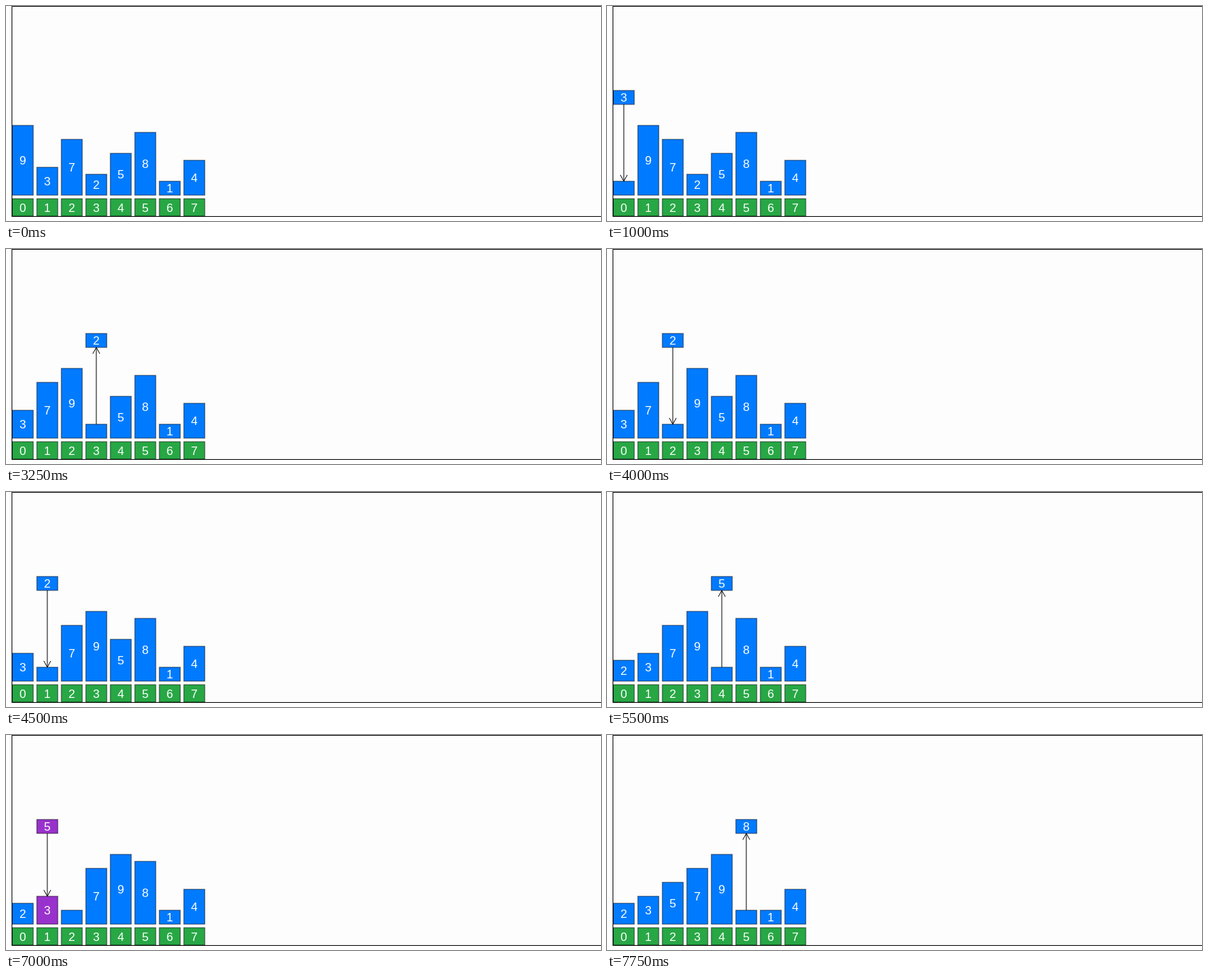
These frames come from a looping animation (850x308 px, 8000 ms). An HTML page with a canvas:

```html
<!DOCTYPE html>
<html lang="en">
<head>
<meta charset="utf-8">
<title>Insertion sort</title>
<style>
  html, body { margin: 0; width: 100%; height: 100%; overflow: hidden; background: #fff; }
  canvas { display: block; }
</style>
</head>
<body>
<canvas id="stage" width="850" height="308"></canvas>
<script>
const STEP = 250, LOOP = 8000;
const BLUE = '#007bff', GREEN = '#28a745', PURPLE = '#9932cc';
const BAR = 30, PITCH = 35, FLOOR = 270, HELD_TOP = 120, HELD_H = 20;
const ctx = document.getElementById('stage').getContext('2d');

// Every state of the sort, in order.
function sortSteps(values) {
  const a = [...values], steps = [];
  const save = (extra = {}) => steps.push({ bars: [...a], ...extra });
  save();
  for (let i = 1; i < a.length; i++) {
    const held = a[i];
    let j = i;
    a[i] = null;
    save({ at: i, held, up: true });
    while (j > 0) {
      save({ at: j, held });
      save({ at: j - 1, held, compare: true });
      if (a[j - 1] <= held) break;
      a[j] = a[j - 1];
      a[--j] = null;
    }
    save({ at: j, held });
    a[j] = held;
    save({ at: j, held: null });
  }
  return steps.slice(0, LOOP / STEP);
}

function box(i, y, h, color, label) {
  const x = i * PITCH;
  ctx.fillStyle = color;
  ctx.fillRect(x, y, BAR, h);
  ctx.strokeStyle = 'rgba(0, 0, 0, .6)';
  ctx.strokeRect(x, y, BAR, h);
  if (label === null) return;
  ctx.fillStyle = '#fff';
  ctx.fillText(label, x + BAR / 2, y + h / 2 + 6);
}

function arrow(x, from, to) {
  const back = to - Math.sign(to - from) * 9;
  ctx.strokeStyle = '#000';
  ctx.beginPath();
  ctx.moveTo(x, from);
  ctx.lineTo(x, to);
  ctx.moveTo(x - 5, back);
  ctx.lineTo(x, to);
  ctx.lineTo(x + 5, back);
  ctx.stroke();
}

const barHeight = v => v === null ? 20 : 10 * v + 10;

function draw({ bars, at, held, up, compare }) {
  ctx.setTransform(1, 0, 0, 1, 0, 0);
  ctx.fillStyle = '#fff';
  ctx.fillRect(0, 0, 850, 308);
  ctx.fillStyle = '#000';
  ctx.fillRect(8, 0, 842, 302);
  ctx.fillStyle = '#fdfdfd';
  ctx.fillRect(9, 1, 841, 300);

  ctx.save();
  ctx.beginPath();
  ctx.rect(9, 1, 841, 300);
  ctx.clip();
  ctx.translate(9, 1);
  ctx.lineWidth = 1;
  ctx.font = '17px "Liberation Sans", Arial, sans-serif';
  ctx.textAlign = 'center';
  ctx.textBaseline = 'alphabetic';

  bars.forEach((v, i) => {
    const h = barHeight(v);
    box(i, FLOOR - h, h, compare && i === at ? PURPLE : BLUE, v);
    box(i, 275, 25, GREEN, i);
  });
  if (at !== undefined) {
    const ends = [HELD_TOP + HELD_H, FLOOR - barHeight(bars[at])];
    if (up) ends.reverse();
    box(at, HELD_TOP, HELD_H, compare ? PURPLE : BLUE, held);
    arrow(at * PITCH + BAR / 2, ...ends);
  }
  ctx.restore();
}

const steps = sortSteps([9, 3, 7, 2, 5, 8, 1, 4]);

function tick() {
  draw(steps[Math.floor(performance.now() % LOOP / STEP)]);
  requestAnimationFrame(tick);
}
tick();
</script>
</body>
</html>
```
